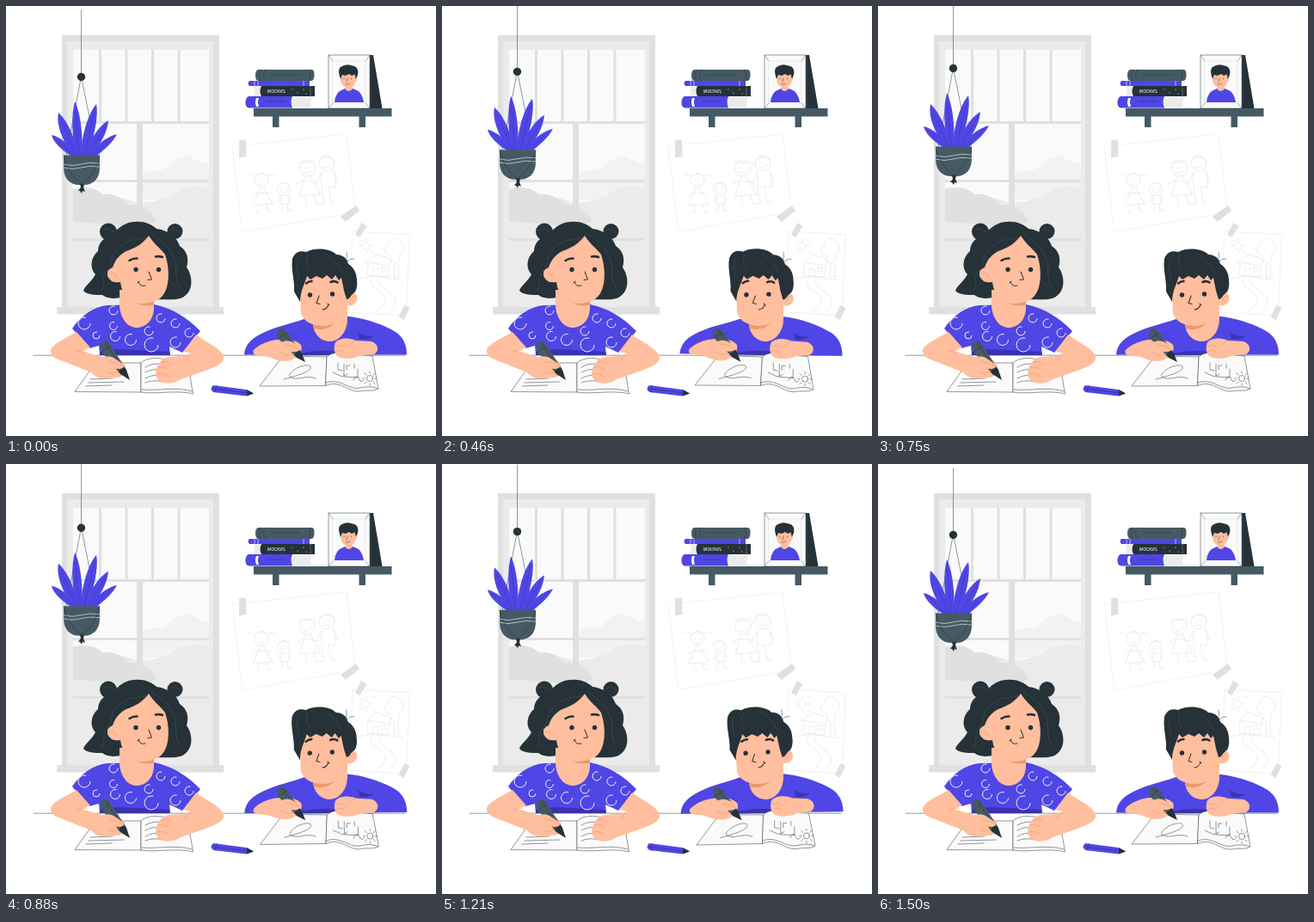
An HTML page that plays this animation: 500x500 px, repeating every 1540 ms.

```html
<!DOCTYPE html>
<html lang="en">
<head>
<meta charset="utf-8">
<title>Children drawing</title>
<style>
html, body { margin: 0; width: 100%; height: 100%; overflow: hidden; background: #fff; }
svg { display: block; width: 100vw; height: 100vh; }
.line { fill: none; stroke: #263238; stroke-width: .5; stroke-linecap: round; stroke-linejoin: round; }
.brow { stroke-width: 2.6; }
.mouth { stroke-width: 1; }
.strand { stroke: #455a64; }
.faint { fill: none; stroke: #e0e0e0; stroke-width: .6; stroke-linecap: round; }
.light { fill: none; stroke: #fff; stroke-width: .6; }
.fold { fill: none; stroke: #eb996e; stroke-width: .6; stroke-linecap: round; }
.rings circle { fill: none; stroke: #fff; stroke-width: .9; stroke-dasharray: 8 2; }
.dark { fill: #263238; }
.slate { fill: #455a64; }
.purple { fill: #4f46e5; }
.shade { fill: #3a33ad; }
.skin { fill: #ffbe9d; }
.blush { fill: #eb996e; }
.page { fill: #fafafa; stroke: #263238; stroke-width: .5; stroke-linejoin: round; }
.tape { fill: #e0e0e0; }
</style>
</head>
<body>
<svg viewBox="0 0 500 500">
  <g id="window">
    <path fill="#e0e0e0" d="M65 34H248V350H65Z"/>
    <path fill="#ebebeb" d="M71 41H241V350H71Z"/>
    <path fill="#fafafa" d="M78 51H236V347H78Z"/>
    <path fill="#f2f2f2" d="M159 195C170 187 178 195 188 187C198 176 204 177 210 174C218 176 226 184 236 183V225H159Z"/>
    <path fill="#ebebeb" d="M78 230C110 218 130 220 150 228C170 230 180 224 192 221C204 209 222 208 236 212V347H78Z"/>
    <path fill="#e0e0e0" d="M78 213C90 209 104 211 112 219C125 218 134 222 142 231C156 230 168 236 175 250C150 262 110 250 78 251Z"/>
    <path fill="none" stroke="#e0e0e0" stroke-width="3" d="M78 135.500H236M78 203.500H236M78 271.500H236M109.500 51V135M140 51V135M170.500 51V135M201 51V135"/>
    <path fill="#e0e0e0" d="M152 136H159V347H152ZM59 350H253V358.500H59Z"/>
  </g>

  <g id="shelf">
    <path class="slate" d="M288 119H448.500V128.500H288ZM310 128H317.500V141H310ZM410.500 128H418V141H410.500Z"/>
    <path class="slate" d="M293 74H356Q359 75 358.500 81Q358 87 355 87H293Q290 86 290 80.500Q290 75 293 74Z"/>
    <path class="line" d="M296 74Q293 80 296 87M301 74Q298 80 301 87M352 74Q355 80 352 87M308 80H342"/>
    <path class="purple" d="M283 87H353V93H283Q280 90 283 87Z"/>
    <path class="light" d="M289 87V93M293 87V93M346 87V93"/>
    <path fill="#ebebeb" d="M288 93.500H302V105H288Q291 99 288 93.500Z"/>
    <path class="dark" d="M297 93H359V105H297Q294 99 297 93Z"/>
    <path class="light" d="M354 93V105" stroke-dasharray="1 1.500"/>
    <g fill="#fff"><circle cx="333" cy="97" r=".5"/><circle cx="339" cy="101" r=".6"/><circle cx="346" cy="97" r=".6"/><circle cx="349" cy="102" r=".5"/></g>
    <text x="303.500" y="101.300" fill="#fff" font-size="5.500" font-style="italic" font-family="'Noto Sans', sans-serif">MOONEL</text>
    <path fill="#ebebeb" d="M330 105.500H357Q352 111 355 117.500H330Z"/>
    <path class="purple" d="M282 105H333Q330 111 333 118.500H282Q278 117 278.500 111.500Q279 106 282 105Z"/>
    <path fill="#fff" d="M291 107H294Q292 111 294 117H291Q289 111 291 107Z"/>
    <path class="line" d="M304 111H324"/>
    <path class="dark" d="M422 57H427L437.500 119H422Z"/>
    <path fill="#fafafa" stroke="#263238" stroke-width=".5" d="M375 57H423V119H375Z"/>
    <path class="line strand" d="M375 57L380 64M375 119L380 113M423 57L418 64M423 119L418 113M424 58V118"/>
    <path class="faint" d="M380 64H418V113H380Z"/>
    <path class="purple" d="M382 112Q383 100 391 97.500L394 96H403L407 97.500Q414 100 416 112Z"/>
    <path class="skin" d="M389 78H407V84Q409 86 406.500 88Q405 93 402.500 94V97Q398 101 394.500 97V94Q389 92 389 84Z"/>
    <path class="dark" d="M389 85Q385 74 389 71Q395 67 401 69Q411 70 409 80L407 85L405.500 79.500L402 81L399 79L395 81L391 80Z"/>
    <path class="line" d="M393 84V85M401.500 84V85M397 84L396 88M395 91Q398 92 400 90"/>
  </g>

  <g id="drawings">
    <path class="faint" d="M263.500 163L396 149L406.500 240L275 262.500Z" style="stroke:#ebebeb"/>
    <path class="tape" d="M271 156L279 155.500L279.500 175L271 176.500ZM389 245L407 232L411 238L395 251Z"/>
    <g class="faint">
      <circle cx="297" cy="203" r="8"/><circle cx="323" cy="213" r="7.500"/><circle cx="350" cy="189" r="9"/><circle cx="373" cy="183" r="9"/>
      <path d="M281 197Q285 192 290 199Q297 191 304 198Q311 193 315 200M294 203V204M300 202V203M293 207Q297 210 301 206M296 211L287 232L310 230L299 211M286 221L295 217L309 218M293 232L294 239L290 240M303 231L305 239L309 239"/>
      <path d="M317 208Q323 203 330 209M320 212V213M326 211V212M319 215Q323 219 327 214M319 220V230H329V220M316 227L320 223M333 226L329 222M321 230V238M327 230L328 238M317 239H321M328 238H333"/>
      <path d="M340 184Q345 177 351 183Q358 175 362 186M346 188V189M353 187V188M345 193Q350 196 355 191M348 198L341 221L366 219L353 198M337 207L347 203L363 206M348 221L350 231L346 232M358 220L361 230L366 230"/>
      <path d="M364 180Q373 170 382 180M370 182V183M376 181V182M369 187Q373 190 378 185M367 192V212L370 229L365 230M370 212L375 209L378 228L383 228M381 191L384 210L379 211M366 195L361 205M381 194L386 204"/>
    </g>
    <path fill="#fff" stroke="#ebebeb" stroke-width=".7" d="M403 262L469.500 266L465 360L399 356Z"/>
    <path class="tape" d="M406 266L413 252L419.500 256L411.500 269ZM456.500 361.500L463.500 348L469.500 351L462.500 365Z"/>
    <g class="faint">
      <circle cx="419" cy="279" r="4.500"/>
      <path d="M410 279H413M426 279H429M419 270V273M419 286V289M412 272L415 275M425 285L428 288M412 286L415 283M425 273L428 270"/>
      <path d="M418 299L431 289L449 295L446 302L420 298M421 300L420 313L444 315L446 302M427 314V305L433 306V314M437 304H442V309H437Z"/>
      <path d="M449 291C438 290 438 280 445 279C444 270 455 267 458 274C465 278 462 288 456 290C462 296 452 304 447 296M452 300L451 315H457L456 300"/>
      <path d="M410 317Q430 312 462 319M424 319C421 330 447 333 440 346Q436 353 431 355M433 319C432 329 460 334 451 350L446 356"/>
    </g>
  </g>

  <g id="plant">
    <path class="line" d="M87.500 5V82M87.500 82L70 174M87.500 82L106 174"/>
    <circle class="dark" cx="87.500" cy="82.500" r="4.700"/>
    <g class="purple">
      <path d="M75 174C63 166 55 158 53 150C63 152 75 162 82 174Z"/>
      <path d="M78 174C65 155 58 138 61 124C72 134 81 155 84 174Z"/>
      <path d="M82 174C76 150 76 126 80 111C87 124 90 155 88 174Z"/>
      <path d="M87 174C88 150 95 126 105 114C108 128 102 155 94 174Z"/>
      <path d="M92 174C98 155 107 140 119 133C118 148 108 163 99 174Z"/>
      <path d="M97 174C104 163 116 152 129 149C124 159 114 167 106 174Z"/>
    </g>
    <path class="line" style="stroke:#3a33ad" d="M58 154L79 174M64 132L82 174M80.500 121L85 174M103 122L91 174M116 139L96 174M123 152L102 174"/>
    <path class="slate" d="M67 173.500H109V188C109 201 101 208 91 208H85C75 208 67 201 67 188Z"/>
    <path class="light" d="M67 184Q77 187 87 184T109 183M67 188Q77 191 87 188T109 187"/>
    <path class="line" d="M67 174Q72 196 88 207Q104 196 109 174"/>
    <path class="dark" d="M86 207H91L90 211L92 216L89 215L88 218L86 215L84 215L87 211Z"/>
  </g>

  <path class="line" d="M32 406.200H464"/>

  <g id="girl">
    <circle class="dark" cx="119" cy="262.500" r="10"/><circle class="dark" cx="196.500" cy="262" r="9"/>
    <path class="dark" d="M90 331C92 325 99 321 104 312C96 303 100 291 107 285C107 276 114 268 124 267C130 257 140 251 150 251C160 250 168 253 175 259C190 261 199 270 202 279C211 285 213 294 210 304C218 315 217 331 208 337C202 343 186 341 172 341L136 338C124 342 116 339 112 336C105 336 94 336 90 331Z"/>
    <path class="purple" d="M118 348L172 347C195 352 210 362 226 378L205 403L190 396L191 406H109L108 395L97 398L77 375C87 360 101 350 118 348Z"/>
    <path class="shade" d="M109 402L130 399L190 402L191 406H109Z"/>
    <path class="skin" d="M132 330H172V350C172 366 162 374 151 374C139 373 132 360 132 347Z"/>
    <path class="blush" d="M151 345Q162 348 172 341V347Q163 351 151 345Z"/>
    <path class="skin" d="M124 304C127 295 132 289 140 285C149 282 159 277 166 267C172 277 180 282 185 289C190 304 190 320 186 330C181 343 170 346 157 345.500C143 344 135 337 133 321Q122 323 118 314Q117 306 124 304Z"/>
    <path class="line strand" d="M167 267C156 275 146 267 132 280C120 290 125 299 118 307C110 314 116 326 111 331M169 264C181 274 189 277 194 291C201 301 194 316 202 327M112 261Q119 256 126 263M191 261Q197 257 203 264"/>
    <path class="fold" d="M122 311Q127 310 129 317"/>
    <g class="dark"><circle cx="151" cy="306.500" r="2.700"/><circle cx="177.500" cy="306.500" r="2.700"/></g>
    <path class="line brow" d="M143.500 296Q148 293 152.500 293.500M174 291.500Q178 290.500 182 292"/>
    <path class="line mouth" d="M166 309L169.500 318L165 318.500M154 321Q156 327 162 325M155 320L153 322"/>
    <g class="rings">
      <circle cx="91" cy="369" r="7" pathLength="10"/><circle cx="105" cy="383" r="4" pathLength="10"/>
      <circle cx="125" cy="354" r="5" pathLength="10"/><circle cx="125" cy="372" r="4.500" pathLength="10"/>
      <circle cx="127" cy="384" r="5.500" pathLength="10"/><circle cx="145" cy="388" r="6.500" pathLength="10"/>
      <circle cx="166" cy="378" r="5" pathLength="10"/><circle cx="180" cy="363" r="5" pathLength="10"/>
      <circle cx="197" cy="369" r="5" pathLength="10"/><circle cx="169" cy="394" r="8" pathLength="10"/>
      <circle cx="197" cy="391" r="6" pathLength="10"/><circle cx="213" cy="380" r="5" pathLength="10"/>
    </g>
    <path class="page" d="M80 448.500L104 415L157 415V449Z"/>
    <path class="page" d="M157 415C164 408 178 409 186 411L211 413L217.500 451C200 446 170 452 157 449Z"/>
    <path class="line" d="M158 446C175 448 197 442 216 448M98 434L124 433M96 438L137 437M93 442L123 441M162 420Q172 414 182 417M162 426Q171 421 180 423M162 433Q171 428 178 430M162 438Q173 434 182 437"/>
    <path class="skin" d="M82 379C72 385 55 392 52 400C51 408 60 411 69 414L99 426C104 434 119 434 128 432C136 432 140 427 138 421C139 414 132 410 124 409L111 408L88 401L98 397Z"/>
    <path class="skin" d="M221 382C229 389 251 398 253 408C254 416 242 420 232 424L203 434C196 439 184 441 177 435C172 429 174 419 181 412C187 406 200 408 207 407L216 404L206 402Z"/>
    <path class="fold" d="M82 402L94 400M118 426Q128 429 137 422M117 420Q127 424 138 417M181 414Q189 412 194 417M177 420Q185 418 190 424M176 428Q183 426 189 431M215 404Q209 408 208 413"/>
    <path class="slate" d="M109.500 394C111 389 117 389 120 392L140 423L133 428L111 402Z"/>
    <path class="dark" d="M137 419L140 423L144 435L133 428L131 425Z"/>
    <path class="line" d="M116 392L134 420M112 402L121 396"/>
    <path class="skin" d="M110 410Q119 404 128 411L137 417Q139 421 132 422L113 421Z"/>
    <path class="fold" d="M120 413Q129 414 137 419"/>
  </g>

  <g id="pencil">
    <path class="purple" d="M241 441L279 446L288 450.500L279 453.500L241 449Q236 445 241 441Z"/>
    <path class="dark" d="M280 446L288 450.500L280 453.500Z"/>
    <path class="line" d="M241 445L280 450M245 441.500Q242 445 244 449.500"/>
  </g>

  <g id="boy">
    <path class="purple" d="M277 405.500C278 393 286 386 300 379.500C316 372 330 370 345 364.500C360 360 385 359 403 361.500C420 364 440 371 453 379C462 385 466 394 466 405.500Z"/>
    <path class="shade" d="M343 404Q362 399 386 402L384 406H343ZM409 379Q415 385 428 384Q419 389 411 387Z"/>
    <path class="line" style="stroke:#3a33ad" d="M335 384Q342 390 346 404M317 387L335 380"/>
    <path class="skin" d="M357 355L397 345V364C397 380 386 391 375 390C364 389 358 380 357 371Z"/>
    <path class="blush" d="M357 370Q370 374 382 369Q371 379 358 375Z"/>
    <path class="skin" d="M341 318C352 307 380 306 393 318L396 335Q404 330 408 337C410 344 404 350 397 348C396 362 382 372 367 372C355 371 346 367 343 357Z"/>
    <path class="dark" d="M342 344L335 332C336 319 331 307 333 294C336 285 343 284 349 286C360 280 378 282 384 289C392 289 397 294 398 300C405 304 408 312 408 319C409 326 407 333 404 334C400 337 400 341 396 341L393 331L390 316L387 319L383 313L379 318L373 313L368 317L361 314L354 318L350 314C347 324 342 332 342 344Z"/>
    <path class="line" d="M395 297Q398 291 396 286M396 298Q400 293 405 294"/>
    <path class="line strand" d="M352 289Q346 298 353 306M372 288Q385 297 390 309M340 294Q337 305 341 316"/>
    <path class="fold" d="M400 343Q401 337 406 337"/>
    <g class="dark"><circle cx="353.500" cy="336" r="2.700"/><circle cx="379.500" cy="335" r="2.700"/></g>
    <path class="line brow" d="M349 322.500Q352 320 355.500 320M377.500 321Q382 319 385.500 321.500"/>
    <path class="line mouth" d="M364 337L361 345.500L365 346.500M368 353Q373 353 375 347M374 346L376 348"/>
    <path class="page" d="M295 442L322 407L373 408L371.500 441.500Z"/>
    <path class="page" d="M373 408C380 401 389 404 399 405L426 407L433 445C426 449 420 446 412 448C398 450 389 434 371.500 441.500Z"/>
    <path class="line" d="M372 438C389 432 398 447 412 444Q425 441 432 445"/>
    <path class="line" d="M323 434C338 430 360 424 353 418C342 416 327 427 330 431C340 437 348 428 360 433M386 415V423L391 424M393 416V431L409 432V422M396 423V418H400M405 416V421M380 426L391 431L397 428M404 435Q407 427 411 434Q412 439 416 435"/>
    <g class="line"><circle cx="423" cy="433" r="3.500"/><path d="M423 425V427M423 439V441M415 433H417M429 433H431M417 427L419 429M427 437L429 439M417 439L419 437M427 429L429 427"/></g>
    <path class="skin" d="M288 400C294 394 304 389 316 388C327 387 338 388 343 394C346 400 340 409 331 412C322 415 313 411 305 408L290 406Q286 404 288 400Z"/>
    <path class="skin" d="M383 391C389 385 400 386 407 389L425 390C434 393 434 402 428 405L411 407C403 411 390 411 385 407C381 403 381 396 383 391Z"/>
    <path class="fold" d="M319 403Q329 409 338 403M320 398Q332 402 342 397M384 396Q390 393 395 397M383 402Q390 398 394 403M407 389Q400 391 399 396"/>
    <path class="slate" d="M315 379C317 374 322 374 325 377L344 404L338 409L316 386Z"/>
    <path class="dark" d="M341.500 400L344 404L348 414L338 409L335 405.500Z"/>
    <path class="line" d="M321 377L339 401M317 386L326 380"/>
    <path class="skin" d="M316 393Q327 386 335 392L342 397Q343 401 337 402L318 403Z"/>
    <path class="fold" d="M325 394Q334 394 341 399"/>
  </g>
</svg>
<script>
const LOOP = 1540, CYCLE = 1500;
const plant = document.getElementById("plant");
const boy = document.getElementById("boy");

// Triangle wave: 0 at phase 0, 1 at .25, -1 at .75
const sway = p => p < .25 ? 4 * p : p < .75 ? 2 - 4 * p : 4 * p - 4;

function draw() {
  const phase = Math.min(performance.now() % LOOP / CYCLE, 1);
  const lift = 10 * (1 - Math.abs(2 * phase - 1));
  plant.setAttribute("transform", `translate(0 ${-lift})`);
  boy.setAttribute("transform", `rotate(${sway(phase)} 371.5 367)`);
  requestAnimationFrame(draw);
}
draw();
</script>
</body>
</html>
```
